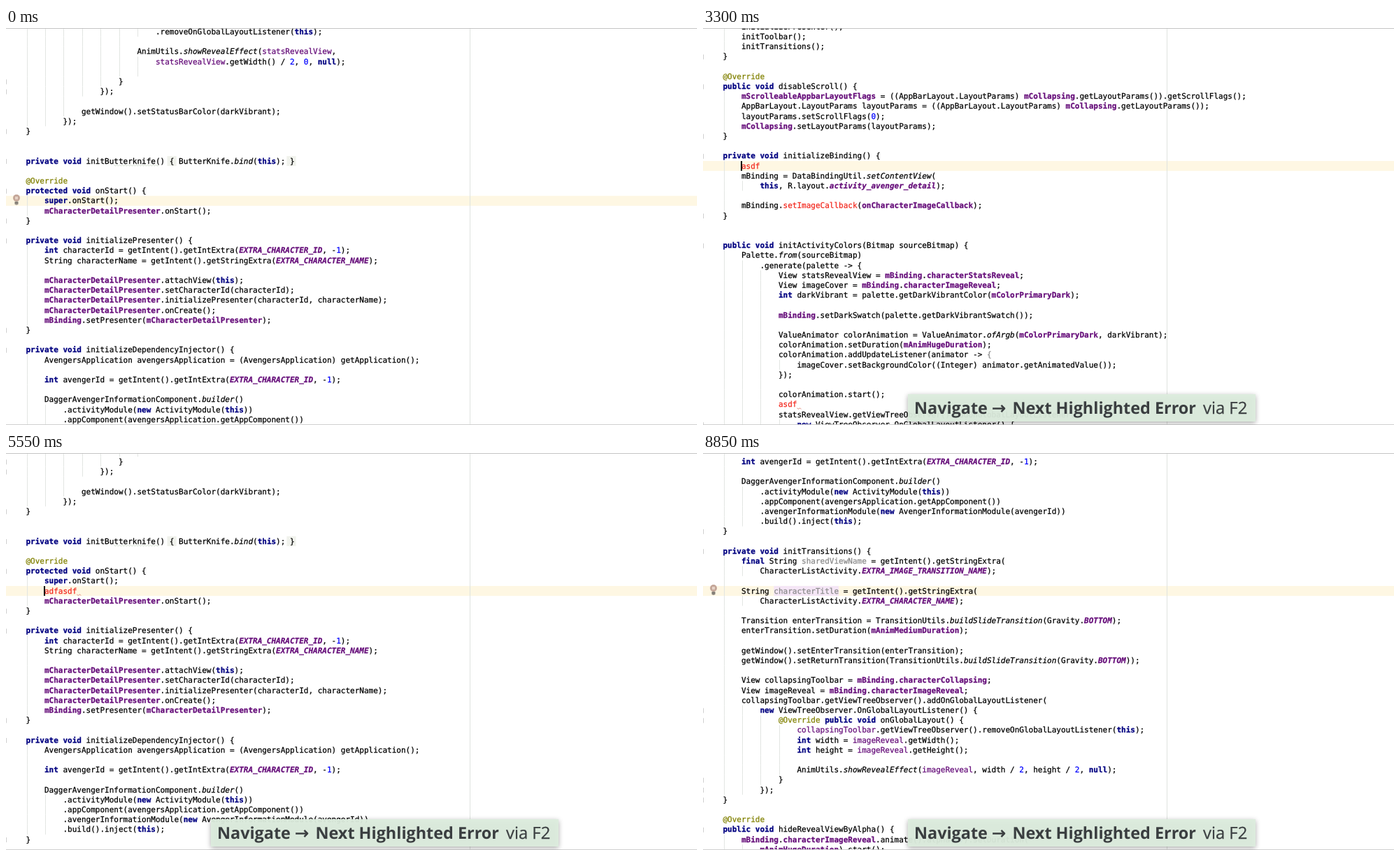
Animation, 988 px wide and 567 px high, one loop 9000 ms. Source, as an HTML page with a canvas:

```html
<!DOCTYPE html>
<html>
<head>
<meta charset="utf-8">
<title>Next Highlighted Error</title>
<style>
html, body { margin: 0; width: 100%; height: 100%; overflow: hidden; background: #fff; }
canvas { display: block; }
</style>
</head>
<body>
<canvas id="stage" width="988" height="567"></canvas>
<script>
const code = `    initializePresenter();
    initToolbar();
    initTransitions();
}

@Override
public void disableScroll() {
    mScrolleableAppbarLayoutFlags = ((AppBarLayout.LayoutParams) mCollapsing.getLayoutParams()).getScrollFlags();
    AppBarLayout.LayoutParams layoutParams = ((AppBarLayout.LayoutParams) mCollapsing.getLayoutParams());
    layoutParams.setScrollFlags(0);
    mCollapsing.setLayoutParams(layoutParams);
}

private void initializeBinding() {
    asdf
    mBinding = DataBindingUtil.setContentView(
        this, R.layout.activity_avenger_detail);

    mBinding.setImageCallback(onCharacterImageCallback);
}


public void initActivityColors(Bitmap sourceBitmap) {
    Palette.from(sourceBitmap)
        .generate(palette -> {
            View statsRevealView = mBinding.characterStatsReveal;
            View imageCover = mBinding.characterImageReveal;
            int darkVibrant = palette.getDarkVibrantColor(mColorPrimaryDark);

            mBinding.setDarkSwatch(palette.getDarkVibrantSwatch());

            ValueAnimator colorAnimation = ValueAnimator.ofArgb(mColorPrimaryDark, darkVibrant);
            colorAnimation.setDuration(mAnimHugeDuration);
            colorAnimation.addUpdateListener(animator -> {
                imageCover.setBackgroundColor((Integer) animator.getAnimatedValue());
            });

            colorAnimation.start();
            asdf
            statsRevealView.getViewTreeObserver().addOnGlobalLayoutListener(
                new ViewTreeObserver.OnGlobalLayoutListener() {
                    @Override public void onGlobalLayout() {
                        statsRevealView.getViewTreeObserver()
                            .removeOnGlobalLayoutListener(this);

                        AnimUtils.showRevealEffect(statsRevealView,
                            statsRevealView.getWidth() / 2, 0, null);
                            
                    }
                });

            getWindow().setStatusBarColor(darkVibrant);
        });
}


private void initButterknife() { ButterKnife.bind(this); }

@Override
protected void onStart() {
    super.onStart();
    adfasdf
    mCharacterDetailPresenter.onStart();
}

private void initializePresenter() {
    int characterId = getIntent().getIntExtra(EXTRA_CHARACTER_ID, -1);
    String characterName = getIntent().getStringExtra(EXTRA_CHARACTER_NAME);

    mCharacterDetailPresenter.attachView(this);
    mCharacterDetailPresenter.setCharacterId(characterId);
    mCharacterDetailPresenter.initializePresenter(characterId, characterName);
    mCharacterDetailPresenter.onCreate();
    mBinding.setPresenter(mCharacterDetailPresenter);
}

private void initializeDependencyInjector() {
    AvengersApplication avengersApplication = (AvengersApplication) getApplication();

    int avengerId = getIntent().getIntExtra(EXTRA_CHARACTER_ID, -1);

    DaggerAvengerInformationComponent.builder()
        .activityModule(new ActivityModule(this))
        .appComponent(avengersApplication.getAppComponent())
        .avengerInformationModule(new AvengerInformationModule(avengerId))
        .build().inject(this);
}

private void initTransitions() {
    final String sharedViewName = getIntent().getStringExtra(
        CharacterListActivity.EXTRA_IMAGE_TRANSITION_NAME);

    String characterTitle = getIntent().getStringExtra(
        CharacterListActivity.EXTRA_CHARACTER_NAME);

    Transition enterTransition = TransitionUtils.buildSlideTransition(Gravity.BOTTOM);
    enterTransition.setDuration(mAnimMediumDuration);

    getWindow().setEnterTransition(enterTransition);
    getWindow().setReturnTransition(TransitionUtils.buildSlideTransition(Gravity.BOTTOM));

    View collapsingToolbar = mBinding.characterCollapsing;
    View imageReveal = mBinding.characterImageReveal;
    collapsingToolbar.getViewTreeObserver().addOnGlobalLayoutListener(
        new ViewTreeObserver.OnGlobalLayoutListener() {
            @Override public void onGlobalLayout() {
                collapsingToolbar.getViewTreeObserver().removeOnGlobalLayoutListener(this);
                int width = imageReveal.getWidth();
                int height = imageReveal.getHeight();

                AnimUtils.showRevealEffect(imageReveal, width / 2, height / 2, null);
            }
        });
}

@Override
public void hideRevealViewByAlpha() {
    mBinding.characterImageReveal.animate().alpha(0f).setDuration(
        mAnimHugeDuration).start();`;

const LOOP = 9000, LINE = 14.2, LEFT = 28.5, CHAR = 6.6226;
const TYPED = 61, ENTER = 150, CHECKED = 1350;
const MONO = '11px "DejaVu Sans Mono", monospace';

const syntax = new RegExp([
  '(?<keyword>\\b(?:private|protected|public|void|super|this|int|new|null|final)\\b)',
  '(?<plain>mBinding(?= =|\\.setImage))',
  '(?<field>\\bm[A-Z]\\w+|(?<=\\.)character[A-Z]\\w+|onCharacterImageCallback)',
  '(?<constant>EXTRA_\\w+|BOTTOM|activity_avenger_detail)',
  '(?<method>showRevealEffect|setContentView|from(?=\\()|ofArgb|builder|buildSlideTransition|bind(?=\\())',
  '(?<captured>(?<=^ {16}.*)(?:statsRevealView|collapsingToolbar|imageReveal)\\b)',
  '(?<unused>sharedViewName|characterTitle|(?<=animator -> )\\{)',
  '(?<number>\\b\\d+f?\\b)',
  '(?<annotation>@Override)',
  '(?<error>\\b(?:asdf|adfasdf|setImageCallback)\\b)'
].join('|'), 'g');

const styles = {
  plain: ['#000', ''], keyword: ['#000080', 'bold '], field: ['#660e7a', 'bold '],
  constant: ['#660e7a', 'italic bold '], method: ['#000', 'italic '], captured: ['#660e7a', ''],
  unused: ['#8a8a8a', ''], number: ['#0000ff', ''], annotation: ['#808000', ''], error: ['#f2281e', '']
};

// Each stop: start time, caret line, caret column, height of the caret line on screen
const stops = [
  [0, 60, 20, 246.8], [ENTER, TYPED, 4, 261], [3150, 14, 4, 197], [4200, 38, 12, 197],
  [5100, TYPED, 4, 197], [6150, 89, 17, 341], [6300, 89, 17, 197], [7050, 92, 11, 197]
];
const usages = [
  [3750, 4600, 'mBinding', '#e6e2f0'], [5700, 6550, 'mCharacterDetailPresenter', '#e6e2f0'],
  [6750, 7450, 'sharedViewName', '#f5e6f6'], [7650, LOOP, 'characterTitle', '#f5e6f6']
];

const texts = code.split('\n');
const indentOf = i => texts[i] ? texts[i].match(/^ */)[0].length : null;
const blocks = [];
const lines = texts.map((text, i) => {
  const tokens = [...text.matchAll(syntax)].map(m => ({
    text: m[0], col: m.index, style: Object.keys(m.groups).find(k => m.groups[k])
  }));
  const plain = text.replace(syntax, m => ' '.repeat(m.length));
  const indent = indentOf(i) ?? Math.min(indentOf(i - 1) ?? 0, indentOf(i + 1) ?? 0);
  let foldable = text.includes('initButterknife');
  if (/^ *}/.test(text)) foldable = blocks.pop() ?? true;
  if (/{$/.test(text)) blocks.push(foldable = !text.includes('->'));
  return { text, tokens, plain, indent, foldable };
});

const ctx = document.getElementById('stage').getContext('2d');
ctx.textRendering = 'geometricPrecision';
const colX = col => LEFT + col * CHAR;
const typedCount = t => Math.max(0, Math.min(7, Math.floor((t - ENTER) / 128)));

function rect(color, x, y, w, h) {
  ctx.fillStyle = color;
  ctx.fillRect(x, y, w, h);
}

// A hairline outline gives the slightly heavier strokes of the editor font
function write(text, x, y, color, font, outline = 0.25) {
  ctx.fillStyle = ctx.strokeStyle = color;
  ctx.font = font;
  ctx.fillText(text, x, y);
  if (!outline) return;
  ctx.lineWidth = outline;
  ctx.strokeText(text, x, y);
}

function squiggle(x, y, width, color) {
  ctx.beginPath();
  for (let i = 0; i <= width; i += 2) ctx.lineTo(x + i, y + (i % 4 ? 1 : -0.5));
  ctx.strokeStyle = color;
  ctx.lineWidth = 0.8;
  ctx.stroke();
}

function bulb(y) {
  ctx.beginPath();
  ctx.arc(15, y - 4, 5, 0, 7);
  ctx.fillStyle = '#c4a698';
  ctx.fill();
  rect('#e6d3c6', 13, y - 6, 4, 4);
  rect('#858078', 12.5, y + 1, 5, 4);
  rect('#aaa49c', 13.5, y + 5, 3, 1);
}

function drawLine(line, i, y, t) {
  const top = y - LINE / 2, base = Math.floor(y + 4);
  for (const [from, to, word, color] of usages) {
    if (t < from || t >= to) continue;
    for (const token of line.tokens)
      if (token.text === word) rect(color, colX(token.col), top, word.length * CHAR, LINE);
  }
  for (let col = 0; col < line.indent; col += 4) rect('#e2e5e2', Math.round(colX(col) + 1), top, 1, LINE);
  if (line.foldable) rect('#cfcfcf', 0, y - 3, 1, 7);
  if (line.text.includes('initButterknife')) {
    for (const col of [30.5, 56.3]) rect('#f0f2ec', colX(col), top, 2 * CHAR, LINE);
    squiggle(colX(19), y + 6, 11 * CHAR - 8, '#c9d6c4');
  }
  write(line.plain, LEFT, base, '#000', MONO);
  for (const { text, col, style } of line.tokens) {
    let [color, weight] = styles[style], shown = text;
    if (i === TYPED && t < CHECKED) {
      shown = text.slice(0, typedCount(t));
      color = '#000';
    }
    write(shown, colX(col), base, color, weight + MONO);
  }
  if (i === 38 || (i === TYPED && t >= CHECKED)) squiggle(colX(line.text.length), y + 5.5, 6, '#d9776a');
}

function drawTip() {
  ctx.save();
  ctx.globalAlpha = 0.94;
  ctx.shadowColor = 'rgba(0,0,0,.35)';
  ctx.shadowBlur = 7;
  ctx.shadowOffsetY = 2;
  rect('#deeddf', 293, 523, 497, 39);
  ctx.restore();
  const ink = '#3a3e40', bold = 'bold 23.4px "Open Sans", sans-serif';
  write('Navigate', 302, 551, ink, bold, 0);
  write('→', 413, 551, ink, '24px "DejaVu Sans", sans-serif', 0.5);
  write('Next Highlighted Error', 442.5, 551, ink, bold, 0);
  write('via F2', 715, 551, ink, '23.8px "Open Sans", sans-serif');
}

function draw(t) {
  const [start, caretLine, caretCol, caretY] = stops.findLast(stop => t >= stop[0]);
  const typing = start === ENTER;
  rect('#fff', 0, 0, 988, 567);
  rect('#fef7e3', 0, caretY - LINE / 2, 988, LINE);
  rect('#dfe3df', 663, 0, 1, 567);

  lines.forEach((line, i) => {
    if (t < ENTER && i === TYPED) return;
    const row = t < ENTER && i > TYPED ? i - 1 : i;
    const y = caretY + (row - caretLine) * LINE;
    if (y > -10 && y < 577) drawLine(line, i, y, t);
  });

  // The blink restarts whenever the caret moves
  const still = start === 0 ? t + 600 : Math.max(0, t - (typing ? 1200 : start));
  if (Math.floor(still / 500) % 2 === 0) {
    const col = caretCol + (typing ? typedCount(t) : 0);
    rect('#000', Math.round(colX(col)) - 1, caretY - 7, 2, 14);
  }
  if (t < ENTER || t >= 7950) bulb(caretY);
  rect('#c4c4c4', 0, 0, 988, 1);
  rect('#d0d0d0', 0, 566, 988, 1);
  if (t >= 3150) drawTip();
}

function tick() {
  draw(performance.now() % LOOP);
  requestAnimationFrame(tick);
}
tick();
</script>
</body>
</html>
```
